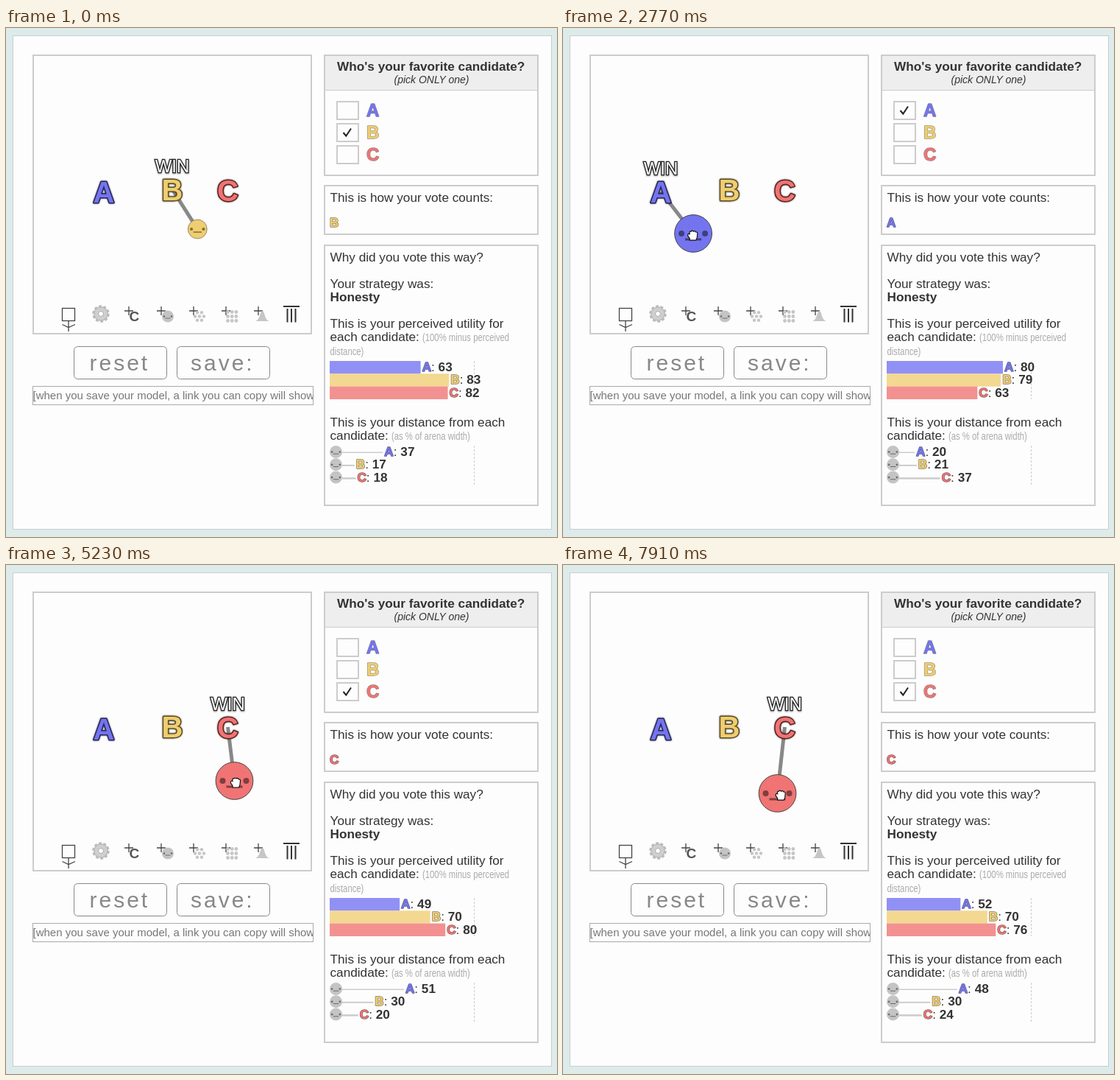
An HTML page that plays this animation: 749x691 px, repeating every 8000 ms.

```html
<!DOCTYPE html>
<html lang="en">
<head>
<meta charset="utf-8">
<title>Vote model</title>
<style>
  html, body { margin: 0; width: 100%; height: 100%; overflow: hidden; background: #ddebeb; }
  svg { display: block; width: 749px; height: 691px; }
  text { font: 17.2px "Liberation Sans", Arial, sans-serif; fill: #333; white-space: pre; }
  .b { font-weight: bold; }
  .box { fill: #fdfdfd; stroke: #ccc; stroke-width: 2; }
  .note { font-size: 13.8px; fill: #aaa; }
  .hint { font-size: 14px; font-style: italic; text-anchor: middle; }
  .btn { font-size: 30px; letter-spacing: 3px; fill: #888; }
  .btnBox { fill: #fdfdfd; stroke: #888; }
  .letter { font-weight: bold; paint-order: stroke; stroke-width: 1.4; stroke-opacity: .75; stroke-linejoin: round; }
  .pick { font-size: 24px; stroke-opacity: .6; }
  .big { font-size: 40px; stroke-width: 3; stroke-opacity: 1; text-anchor: middle; filter: drop-shadow(0 0 1px #0008); }
  .win { font-size: 24px; fill: #fff; stroke: #222; stroke-width: 2.6; paint-order: stroke;
         text-anchor: middle; filter: drop-shadow(0 1px 1px #0005); }
  .line { stroke: #444; stroke-width: 1.3; fill: none; }
  .dash { stroke: #ccc; stroke-dasharray: 3 2; }
</style>
</head>
<body>
<svg id="stage" viewBox="0 0 749 691"></svg>
<script>
const LOOP = 8000, STEP = 120, ARENA = 379, RADIUS = 25.4;
const cands = [
  { id: 'A', x: 133, y: 222, fill: '#7474ee', edge: '#25255c', bar: '#9191f5' },
  { id: 'B', x: 226, y: 219, fill: '#efcd70', edge: '#5c4c20', bar: '#f3d891' },
  { id: 'C', x: 301.5, y: 220, fill: '#f07474', edge: '#5c2222', bar: '#f39191' }
];

const home = { x: 260.3, y: 273 };
const drags = [
  { start: 2230, steps: 7, x: 163, y: 280 },
  { start: 3550, steps: 5, x: 201.5, y: 279 },
  { start: 4690, steps: 5, x: 310.5, y: 293 },
  { start: 6020, steps: 5, x: 275.5, y: 300 },
  { start: 6650, steps: 5, x: 242, y: 306 },
  { start: 7790, steps: 3, x: 304.7, y: 311 }
];

const clamp = u => Math.min(1, Math.max(0, u));
const ease = u => u * u * u * (10 + u * (6 * u - 15));
const mix = (a, b, u) => ({ x: a.x + (b.x - a.x) * u, y: a.y + (b.y - a.y) * u });

// voter position, and where it will be one step later
function voterAt(t) {
  let from = home, pos = home, next = home;
  for (const d of drags) {
    if (t < d.start) break;
    const k = Math.floor((t - d.start) / STEP);
    pos = mix(from, d, ease(clamp((k + 1) / d.steps)));
    next = mix(from, d, ease(clamp((k + 2) / d.steps)));
    from = d;
  }
  return { pos, next };
}

function arrowAt(t) {
  const u = clamp(Math.floor((t - 560) / 132) / 7);
  return { x: 45 + 213 * (1 - (1 - u) ** 2.3), y: 650 - 374 * Math.sin(u * Math.PI / 2) };
}

const radiusAt = t => t < 1740 ? 13 : t < 1860 ? 20 : RADIUS;

const text = (x, y, s, cls = '', more = '') => `<text x="${x}" y="${y}" class="${cls}" ${more}>${s}</text>`;
const note = (x, y, s) => text(0, 0, s, 'note', `transform="translate(${x} ${y}) scale(.82 1)"`);
const rect = (x, y, w, h, cls, more = '') => `<rect x="${x}" y="${y}" width="${w}" height="${h}" class="${cls}" ${more}/>`;
const path = (d, cls, more = '') => `<path d="${d}" class="${cls}" ${more}/>`;
const dot = (x, y, r, fill, more = '') => `<circle cx="${x}" cy="${y}" r="${r}" fill="${fill}" ${more}/>`;
const ink = c => `style="fill:${c.fill};stroke:${c.edge}"`;
const plus = (x, y) => path(`M${x - 6} ${y}h12M${x} ${y - 6}v12`, 'line');
const repeat = (n, fn) => Array.from({ length: n }, (_, i) => fn(i)).join('');

const features = '<g fill="#0007"><circle cx="-16" r="4"/><circle cx="16" r="4"/><rect x="-11" y="6.5" width="22" height="3"/></g>';
const grayFace = (x, y, r) => dot(x, y, r, '#c4c4c4') +
  `<g transform="translate(${x} ${y}) scale(${r / RADIUS})">${features}</g>`;

function toolbar() {
  const gray = '#c6c6c6';
  return rect(76.5, 380.5, 17, 17, 'line') + path('M85 398v14M76.5 402.5L85 406.5L94 402.5', 'line') +
    dot(129, 388, 10, '#ccc', 'stroke="#bbb" stroke-width="3.5" stroke-dasharray="3.8 2.48"') +
    dot(129, 388, 9, '#cfcfcf', 'stroke="#b8b8b8"') + dot(129, 388, 3.5, '#fdfdfd', 'stroke="#aaa"') +
    repeat(5, i => plus(167 + 44 * i, 384)) +
    text(167.5, 398, 'C', 'b', 'style="font-size:19px;fill:#555"') +
    grayFace(220, 391.5, 8) +
    dot(263, 391.5, 2.2, gray) +
    repeat(6, i => dot(263 + 6 * Math.cos(i * Math.PI / 3), 391.5 + 6 * Math.sin(i * Math.PI / 3), 2.2, gray)) +
    repeat(9, i => dot(301.5 + i % 3 * 5.7, 385.5 + Math.floor(i / 3) * 6, 2.4, gray)) +
    path('M339 398C346 396 345 384 348.5 384C352 384 351 396 358 398Z', '', `fill="${gray}"`) +
    path('M377 378h22M382.5 381v18.5M388 381v18.5M393.5 381v18.5', 'line', 'style="stroke:#333;stroke-width:2"');
}

function panels() {
  return rect(433, 37, 290, 163, 'box') + rect(434, 38, 288, 46, '', 'fill="#eee"') +
    path('M434 84.5h288', '', 'stroke="#ccc"') +
    text(577.7, 58, "Who's your favorite candidate?", 'b', 'text-anchor="middle"') +
    text(578.5, 75, '(pick ONLY one)', 'hint') +
    cands.map((c, i) => rect(450, 100 + 30 * i, 29, 24, 'box') +
      text(490, 120 + 30 * i, c.id, 'letter pick', ink(c))).join('') +
    rect(433, 214, 290, 66, 'box') + text(440.5, 236, 'This is how your vote counts:') +
    rect(433, 295, 290, 353, 'box') +
    text(440.5, 317, 'Why did you vote this way?') +
    text(440.5, 353, 'Your strategy was:') + text(440.5, 371, 'Honesty', 'b') +
    text(440.5, 407, 'This is your perceived utility for') +
    text(440.5, 425, 'each candidate:') + note(566, 425, '(100% minus perceived') + note(440.5, 444, 'distance)') +
    text(440.5, 541, 'This is your distance from each') +
    text(440.5, 559, 'candidate:') + note(524, 559, '(as % of arena width)') +
    path('M636.5 452v52M636.5 567v53', 'dash');
}

function controls() {
  return rect(92.5, 432.5, 126, 44, 'btnBox', 'rx="5"') + text(113.5, 465, 'reset', 'btn') +
    rect(232.5, 432.5, 126, 44, 'btnBox', 'rx="5"') + text(251, 465, 'save:', 'btn') +
    '<clipPath id="field"><rect x="36" y="486" width="381.5" height="26"/></clipPath>' +
    rect(36.5, 486.5, 381, 25, '', 'fill="#fdfdfd" stroke="#aaa"') +
    text(36.5, 504, '[when you save your model, a link you can copy will show', '',
      'clip-path="url(#field)" style="font-size:15px;fill:#777"');
}

const label = (c, y, kind) => text(0, y,
  `<tspan class="letter" ${ink(c)}>${c.id}</tspan>: <tspan class="b" id="${kind + c.id}"></tspan>`, '', `id="${kind}Label${c.id}"`);

const meters = () => cands.map((c, i) => {
  const y = 17.3 * i;
  return rect(440, 452 + y, 0, 17.4, '', `id="bar${c.id}" fill="${c.bar}"`) + label(c, 466 + y, 'util') +
    rect(457, 575.5 + y, 0, 1.5 + i / 2, '', `id="gap${c.id}" fill="#ccc"`) +
    grayFace(448.5, 575.5 + y, 8.5) + label(c, 581 + y, 'dist');
}).join('');

stage.innerHTML =
  rect(9.5, 10.5, 732, 670, '', 'fill="#fdfdfd" stroke="#ccc"') +
  rect(37, 37, 378, 378, 'box') + toolbar() + controls() + panels() + meters() +
  path('M458.5 142L462.3 146.5L469 136.5', '', 'id="check" fill="none" stroke="#222" stroke-width="2"') +
  text(440, 270, '', 'letter', 'id="vote"') +
  '<line id="link" stroke="#888" stroke-width="5"/>' +
  cands.map(c => text(c.x, c.y + 14.7, c.id, 'letter big', ink(c))).join('') +
  text(0, 0, 'WIN', 'win', 'id="win"') +
  `<g id="voter"><circle id="skin" r="${RADIUS}" stroke="#444"/>${features}</g>` +
  path('M0 0V16L4 12.5L6.5 18.5L9 17.5L6.5 11.5H11.5Z', '', 'id="arrow" fill="#fff" stroke="#111"') +
  path('M-4 6.5V4L-6.5 .5Q-7 -3 -4 -2Q-5 -6 -2 -5.5Q-1 -7.5 1 -5.5Q3 -7 4 -4.8Q7 -5 6.5 -2L6 3L4.5 6.5Z',
    '', 'id="hand" fill="#fff" stroke="#111" stroke-width="1.2"');

const $ = id => document.getElementById(id);
const set = (id, attrs) => Object.entries(attrs).forEach(([k, v]) => $(id).setAttribute(k, v));
const move = (x, y) => `translate(${x} ${y})`;
const show = on => on ? 'visible' : 'hidden';

function render(t) {
  const { pos, next } = voterAt(t);
  const dist = cands.map(c => Math.hypot(c.x - pos.x, c.y - pos.y) / ARENA * 100);
  const best = dist.indexOf(Math.min(...dist)), c = cands[best];

  cands.forEach(({ id }, i) => {
    const d = dist[i], whole = Math.ceil(d), w = 196 - 2 * d;
    set('bar' + id, { width: w });
    set('utilLabel' + id, { x: 442 + w });
    set('gap' + id, { width: Math.max(0, 2 * d - 17) });
    set('distLabel' + id, { x: 442 + 2 * d });
    $('util' + id).textContent = 100 - whole;
    $('dist' + id).textContent = whole;
  });

  set('check', { transform: move(0, (best - 1) * 30) });
  set('vote', { style: `fill:${c.fill};stroke:${c.edge}` });
  $('vote').textContent = c.id;
  set('link', { x1: pos.x, y1: pos.y, x2: c.x, y2: c.y });
  set('win', { x: c.x, y: c.y - 23 });
  set('voter', { transform: `${move(pos.x, pos.y)} scale(${radiusAt(t) / RADIUS})` });
  set('skin', { fill: c.fill });

  // the hand runs a little ahead of the voter
  const arrow = arrowAt(t), held = t >= 1490;
  const hand = mix(pos, next, .2);
  set('arrow', { visibility: show(t >= 560 && !held), transform: move(arrow.x, arrow.y) });
  set('hand', { visibility: show(held), transform: move(hand.x + 1.5, hand.y + 2.5) });
}

const start = performance.now();
function tick() {
  render((performance.now() - start) % LOOP);
  requestAnimationFrame(tick);
}
tick();
</script>
</body>
</html>
```
